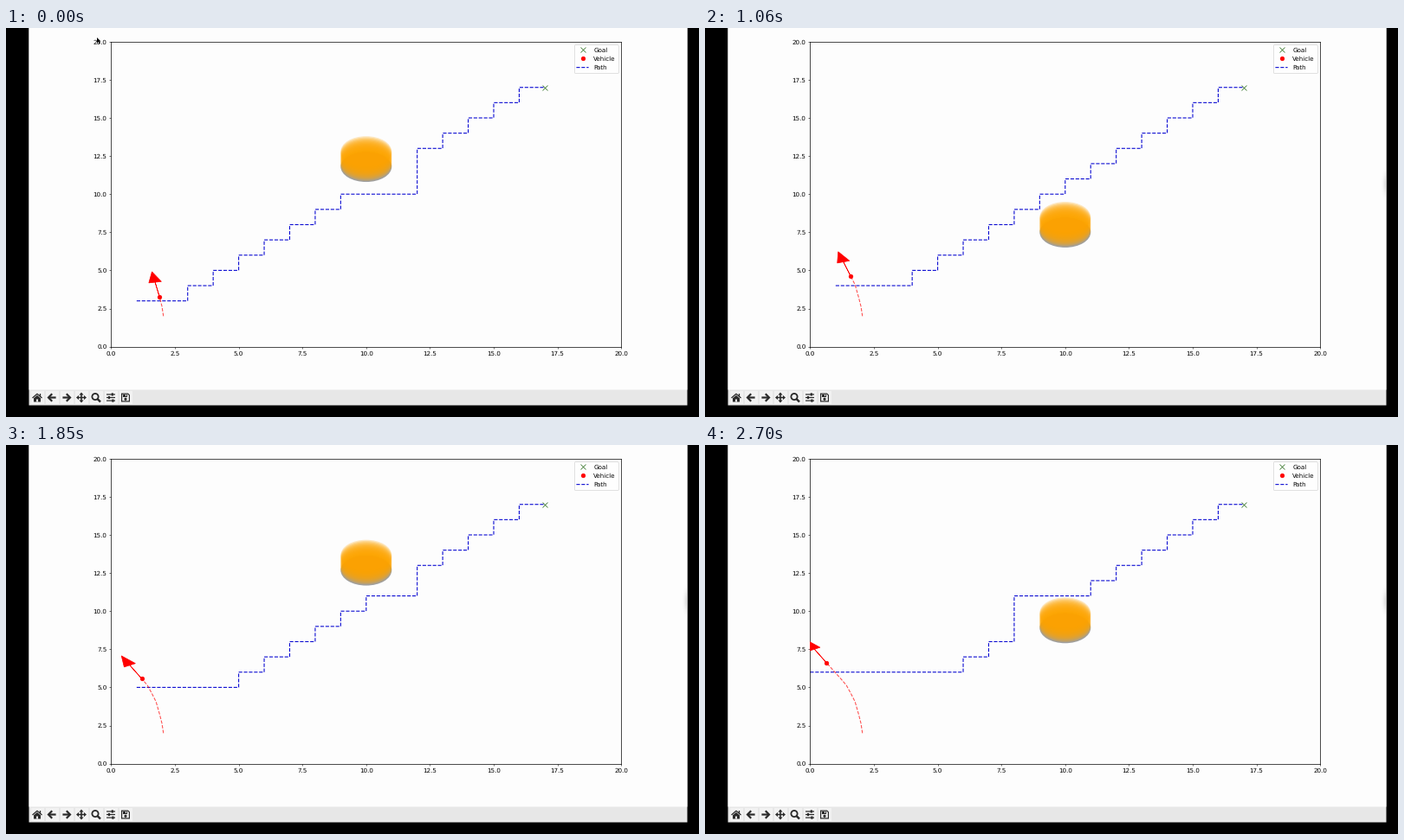
A matplotlib script that plays this animation: 800 by 450 pixels, repeating every 2.73 s.

```python
import numpy as np
import matplotlib.pyplot as plt
from matplotlib.animation import FuncAnimation
from matplotlib.patches import Circle, Polygon, Rectangle

W, H, DPI = 800, 450, 50
FRAMES, INTERVAL = 91, 30
PX = 72 / DPI  # points per pixel
PAPER, BAR, BUTTON, INK = "#fdfdfd", "#e7e7e7", "#f2f2f2", "#2a2a2a"
BLUE, GREEN = "#0a0ad2", "#2c6e1e"
GOAL = (17, 17)

plt.rcParams.update({"font.family": "DejaVu Sans", "font.size": 10.3,
                     "text.hinting": "none", "axes.linewidth": 1,
                     "toolbar": "None"})
fig = plt.figure(figsize=(W / DPI, H / DPI), dpi=DPI, facecolor="black")


def stage(z):
    """Transparent axes measured in pixels, y pointing down."""
    a = fig.add_axes([0, 0, 1, 1], zorder=z)
    a.set(xlim=(0, W), ylim=(H, 0))
    a.axis("off")
    return a


back, front = stage(0), stage(2)
back.add_patch(Rectangle((26.5, -1), 760, 437.5, color=BAR, lw=0, snap=False))
back.add_patch(Rectangle((26.5, -1), 760, 419.5, color=PAPER, lw=0, snap=False))

# Soft shadow at the right edge of the window
gy, gx = np.mgrid[0:40, 0:9]
shade = np.zeros((40, 9, 4))
shade[..., 3] = 0.13 * np.exp(-((gx - 9) / 3.5) ** 2 - ((gy - 20) / 11) ** 2)
glow = back.imshow(shade, extent=(777, 786, 200, 160), aspect="auto", zorder=3)
back.set(xlim=(0, W), ylim=(H, 0))


# Toolbar icons
def stroke(xs, ys, w=1.3):
    front.plot(xs, ys, color=INK, lw=w * PX, solid_capstyle="butt",
               solid_joinstyle="miter", snap=False)


def fill(points, color=INK):
    front.add_patch(Polygon(points, color=color, lw=0, snap=False))


def home(x, y):
    stroke([x - 5.5, x, x + 5.5], [y + 0.5, y - 4.3, y + 0.5], 1.3)
    fill([(x - 4, y + 0.8), (x, y - 2.6), (x + 4, y + 0.8),
          (x + 4, y + 5), (x - 4, y + 5)])
    fill([(x - 1, y + 5), (x - 1, y + 2), (x + 1, y + 2), (x + 1, y + 5)],
         BUTTON)
    stroke([x + 3.5, x + 3.5], [y - 4.5, y - 1.5], 1.3)


def arrow_left(x, y, s=1):
    stroke([x + s * 4.6, x - s * 4], [y, y], 2.2)
    stroke([x + s * 0.2, x - s * 4, x + s * 0.2], [y - 4.3, y, y + 4.3], 2.2)


def arrow_right(x, y):
    arrow_left(x, y, -1)


def move(x, y):
    stroke([x - 4, x + 4], [y, y], 1.6)
    stroke([x, x], [y - 4, y + 4], 1.6)
    for s in (-1, 1):
        fill([(x + s * 6, y), (x + s * 3, y - 2.6), (x + s * 3, y + 2.6)])
        fill([(x, y + s * 6), (x - 2.6, y + s * 3), (x + 2.6, y + s * 3)])


def zoom(x, y):
    front.add_patch(Circle((x - 1, y - 1), 3.6, fill=False, ec=INK, lw=1.8 * PX))
    stroke([x + 1.6, x + 5], [y + 1.6, y + 5], 2.4)


def sliders(x, y):
    for dy, knob in ((-3.6, 1.8), (0, -2), (3.6, 2.4)):
        stroke([x - 5, x + 5], [y + dy, y + dy], 1.2)
        stroke([x + knob, x + knob], [y + dy - 1.6, y + dy + 1.6], 2.2)


def save(x, y):
    fill([(x - 5, y - 5), (x + 3, y - 5), (x + 5, y - 3), (x + 5, y + 5),
          (x - 5, y + 5)])
    fill([(x - 3.8, y - 3.8), (x + 2.5, y - 3.8), (x + 3.8, y - 2.5),
          (x + 3.8, y + 3.8), (x - 3.8, y + 3.8)], BUTTON)
    front.add_patch(Rectangle((x - 2.8, y - 4), 4.8, 3.2, color=INK, lw=0))
    front.add_patch(Rectangle((x + 0.2, y - 3.7), 1.2, 2, color=BUTTON, lw=0))
    front.add_patch(Circle((x, y + 1.8), 1.6, color=INK, lw=0))


ICONS = (home, arrow_left, arrow_right, move, zoom, sliders, save)
for n, icon in enumerate(ICONS):
    cx, cy = 36 + 17 * n, 427.5
    front.add_patch(Rectangle((cx - 7.5, cy - 7.5), 15, 15, color=BUTTON, lw=0))
    icon(cx, cy)

POINTER = np.array([(105, 11), (105, 17.2), (106.4, 15.9), (107.4, 18.2),
                    (108.5, 17.7), (107.5, 15.6), (109.3, 15.4)])
pointer = front.add_patch(Polygon(POINTER, color="black", lw=0))

# Plot
LEFT, RIGHT, BOTTOM, TOP = 121.4, 710.2, 81.4, 434.2
ax = fig.add_axes([LEFT / W, BOTTOM / H, (RIGHT - LEFT) / W, (TOP - BOTTOM) / H],
                  zorder=1, facecolor=PAPER)
ax.set(xlim=(0, 20), ylim=(0, 20))
ticks = np.arange(0, 20.1, 2.5)
ax.set_xticks(ticks)
ax.set_yticks(ticks)

LAYERS = 14
shadow = ax.add_patch(Circle((10, 10), 1, color="gray", alpha=0.75, lw=0))
layers = [ax.add_patch(Circle((10, 10), 1, color="orange", alpha=0.23, lw=0))
          for _ in range(LAYERS)]
ax.plot(*GOAL, "x", color=GREEN, ms=10, mew=1, ls="none", label="Goal")
dot, = ax.plot([], [], "ro", ms=6.6, label="Vehicle", zorder=4)
route, = ax.plot([], [], "--", color=BLUE, lw=1.6, label="Path", snap=False)
trail, = ax.plot([], [], "r--", lw=1.5, alpha=0.7)
arrow = ax.arrow(2, 2, 0, 1, head_width=0.5, head_length=0.7,
                 fc="red", ec="red", zorder=3)
legend = ax.legend(loc="upper right", fontsize=10.2)
for line in legend.get_lines():
    line.set_snap(False)

# Poses along the drive
KEYS = [0, 22, 35, 50, 61, 79, 90]
CAR_X = [1.90, 1.76, 1.596, 1.42, 1.20, 0.85, 0.638]
CAR_Y = [3.24, 4.06, 4.60, 5.14, 5.57, 6.22, 6.62]
HEADING = [100.2, 103.7, 107, 118, 118, 118, 118]
PHASE = [0.927, 2.647, 3.727, 4.924, 5.816, 7.338, 8.230]


def car(i):
    return np.interp(i, KEYS, CAR_X), np.interp(i, KEYS, CAR_Y)


def obstacle_y(phase):
    return 10 + 3 * np.cos(phase)


def plan(x, y, oy):
    """Staircase to the goal, stepping around the obstacle's cells."""
    def blocked(cx, cy):
        return 9 <= cx <= 11 and abs(cy - oy) <= 1.3

    cells = [(x, y)]
    while (x, y) != GOAL:
        up = y < GOAL[1] and (x >= y or x == GOAL[0])
        if up and blocked(x, y + 1):
            up = False
        elif not up and blocked(x + 1, y):
            up = True
        x, y = (x, y + 1) if up else (x + 1, y)
        cells.append((x, y))
    return np.array(cells)


def draw(i):
    x, y = car(i)
    phase = np.interp(i, KEYS, PHASE)
    oy = obstacle_y(phase)
    shadow.set_center((10, oy))
    for k, layer in enumerate(layers, 1):
        layer.set_center((10, oy + k / LAYERS))

    # The planner sees the obstacle slightly late
    route.set_data(*plan(int(x), int(y), obstacle_y(phase - 0.15)).T)

    tx, ty = car(np.arange(i + 1))
    trail.set_data(np.r_[2.05, 1.99, tx], np.r_[2.0, 2.65, ty])
    dot.set_data([x], [y])
    a = np.radians(np.interp(i, KEYS, HEADING))
    arrow.set_data(x=x, y=y, dx=np.cos(a), dy=np.sin(a))

    pointer.set_xy(POINTER - (0, 6 * i))
    pointer.set_visible(i < 4)
    glow.set_visible(i >= 8)
    return []


anim = FuncAnimation(fig, draw, frames=FRAMES, init_func=lambda: draw(0),
                     interval=INTERVAL, repeat=True, repeat_delay=0, blit=False)
plt.show()
```
